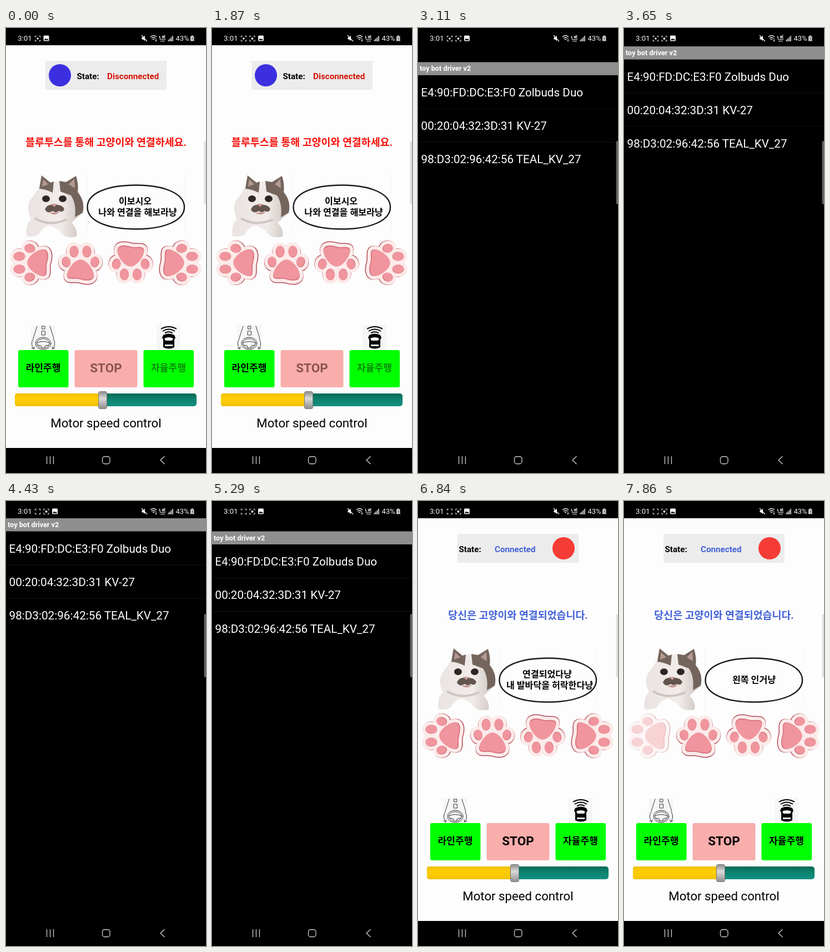
An HTML page that plays this animation: 360 by 800 pixels, repeating every 8000 ms.

```html
<!DOCTYPE html>
<html lang="ko">
<head>
<meta charset="utf-8">
<title>Remote</title>
<style>
html, body { margin: 0; width: 100%; height: 100%; overflow: hidden; background: #000; }
svg { display: block; width: 360px; height: 800px; font-family: Roboto, "Noto Sans CJK KR", sans-serif; }
.b { font-weight: 700; }
.mid { text-anchor: middle; }
.line { fill: none; stroke: #222; stroke-width: .9; stroke-linecap: round; }
.bubble { font-size: 16.1px; }
.mode { font-size: 17.1px; }
</style>
</head>
<body>
<svg viewBox="0 0 360 800">
  <defs>
    <linearGradient id="gold" x2="0" y2="1">
      <stop stop-color="#f2c000"/><stop offset=".4" stop-color="#ffce05"/><stop offset="1" stop-color="#f2c200"/>
    </linearGradient>
    <linearGradient id="teal" x2="0" y2="1">
      <stop stop-color="#056b58"/><stop offset=".5" stop-color="#0f8470"/><stop offset="1" stop-color="#129080"/>
    </linearGradient>
    <linearGradient id="metal" x2="0" y2="1">
      <stop stop-color="#8c8c8c"/><stop offset=".4" stop-color="#dadada"/><stop offset="1" stop-color="#8e8e8e"/>
    </linearGradient>
    <linearGradient id="fur">
      <stop stop-color="#e9e3e1"/><stop offset=".6" stop-color="#f1ecea"/><stop offset="1" stop-color="#c9c0bb"/>
    </linearGradient>
    <g id="pads">
      <path d="M0-6C11-6 24 11 24 22S10 32 0 29S-24 32-24 22S-11-6 0-6Z"/>
      <ellipse cx="-26" cy="-2" rx="7.500" ry="9.500" transform="rotate(-18 -26 -2)"/>
      <ellipse cx="26" cy="-2" rx="7.500" ry="9.500" transform="rotate(18 26 -2)"/>
      <ellipse cx="-11.500" cy="-21" rx="8" ry="10.500"/>
      <ellipse cx="11.500" cy="-21" rx="8" ry="10.500"/>
    </g>
    <g id="paw">
      <use href="#pads" y="1" fill="#b34a55" stroke="#b34a55" stroke-width="13" stroke-linejoin="round"/>
      <use href="#pads" fill="#fbebea" stroke="#fbebea" stroke-width="12" stroke-linejoin="round"/>
      <use href="#pads" fill="#d8747f"/>
      <use href="#pads" y="-1" fill="#f0959d" transform="scale(.97)"/>
    </g>
    <path id="shot" d="M-4.500-2V-4.500H-2M2-4.500H4.500V-2M4.500 2V4.500H2M-2 4.500H-4.500V2" fill="none" stroke="#ddd" stroke-width="1.100"/>
  </defs>

  <rect width="360" height="800"/>

  <g id="main">
    <rect y="31" width="360" height="724" fill="#fdfdfd"/>
    <rect x="71" y="59" width="218" height="52" fill="#ececec"/>
    <circle id="link" cy="85" r="20"/>
    <text id="label" class="b" y="91.500" font-size="15.200">State:</text>
    <text id="state" class="b" y="91.500" font-size="15.200"></text>
    <text id="notice" class="b mid" x="180" y="212" font-size="18.400"></text>

    <g id="cat">
      <path d="M37 374Q34 354 45 344Q34 322 46 306Q56 294 60 284L64 265L80 278Q94 273 108 277L126 266Q131 282 129 295Q143 312 138 332L118 350Q130 362 127 375Q104 380 96 364L80 355Q66 357 59 371Q48 377 37 374Z" fill="url(#fur)"/>
      <path d="M60 289L64 265L80 278L86 276L84 296Q72 290 60 289ZM96 275L108 277L126 266Q131 282 129 295Q143 312 138 332L124 340Q127 316 117 301L98 294Z" fill="#74655c"/>
      <path d="M65 285L67 272L76 281ZM113 281L123 271L124 288Z" fill="#b59a92"/>
      <ellipse cx="72" cy="307" rx="7" ry="6" fill="#2d2522"/>
      <ellipse cx="102" cy="307" rx="7" ry="6" fill="#2d2522"/>
      <path d="M70 326Q74 316 86 318Q100 316 105 325Q103 333 95 329Q90 333 84 329Q74 335 70 326Z" fill="#63554d"/>
      <path d="M81 316H92L87 322Z" fill="#d19d98"/>
      <path d="M78 332Q87 339 97 331Z" fill="#c9938f"/>
      <path d="M52 342Q78 358 110 344" fill="none" stroke="#cfc5c0" stroke-width="4"/>
    </g>

    <path d="M145.500 264V376M322.500 264V376" stroke="#f5f5f5"/>
    <path d="M146.500 322C146.500 297 182 282.500 234 282.500S321 298 321 322S286 361.500 234 361.500S146.500 347 146.500 322Z" fill="#fdfdfd" stroke="#1b1b1b" stroke-width="2.400"/>
    <text id="say1" class="b mid bubble"></text>
    <text id="say2" class="b mid bubble" x="237" y="337"></text>

    <use id="left" href="#paw" transform="translate(45 422) rotate(-90)"/>
    <use href="#paw" transform="translate(134 423)"/>
    <use href="#paw" transform="translate(224.500 422) rotate(180)"/>
    <use href="#paw" transform="translate(314 422) rotate(90)"/>

    <rect x="45" y="534" width="44" height="45" fill="#f6f6f6"/>
    <g class="line">
      <path d="M56 536L49 558M79 536L86 558M65 536H70V541H65ZM64.500 545H70.500V552H64.500Z"/>
      <ellipse cx="67" cy="567" rx="14" ry="11"/>
      <ellipse cx="67" cy="567" rx="11.500" ry="8.500"/>
      <path d="M56 566Q67 561 78 566M57 570L63 571L65 575M77 570L71 571L69 575"/>
      <path d="M49 559Q43 568 50 577M46 575L50 577L51 573M85 559Q91 568 84 577M88 575L84 577L83 573"/>
    </g>
    <rect x="271" y="534" width="43" height="45" fill="#f6f6f6"/>
    <path d="M279 541Q293 533 307 541M282 545Q293 538 304 545M286 548.500Q293 544 300 548.500" fill="none" stroke="#000" stroke-width="2"/>
    <path d="M283 552Q293 547 303 552L305 557L303 560V574Q293 579 283 574V560L281 557Z"/>
    <path d="M285 558Q293 554 301 558L299 562H287ZM286 569H300V572H286Z" fill="#f6f6f6"/>

    <rect x="22" y="579" width="90.500" height="67" rx="3" fill="#0f0"/>
    <rect x="123.500" y="579" width="113" height="67" rx="3" fill="#f9aeac"/>
    <rect x="247.500" y="579" width="90.500" height="67" rx="3" fill="#0f0"/>
    <text class="b mid mode" x="67" y="616.500">라인주행</text>
    <text id="stop" class="b mid" x="180" y="619" font-size="22.500">STOP</text>
    <text id="auto" class="b mid mode" x="292.500" y="616.500">자율주행</text>

    <rect x="16" y="657" width="327" height="23" rx="5" fill="url(#teal)"/>
    <path d="M174 657H21Q16 657 16 662V675Q16 680 21 680H174Z" fill="url(#gold)"/>
    <rect x="166.500" y="653.500" width="15" height="31" rx="3" fill="url(#metal)" stroke="#777"/>
    <text class="mid" x="180" y="717.500" font-size="22.200">Motor speed control</text>
  </g>

  <g id="list">
    <rect y="-400" width="360" height="1400"/>
    <rect width="360" height="23.500" fill="#8f8f8f"/>
    <text class="b" x="3" y="16" font-size="12.700" fill="#fff">toy bot driver v2</text>
    <path d="M0 83.500H360M0 144H360" stroke="#121212"/>
    <g font-size="20.700" fill="#fff">
      <text x="5.500" y="61.500">E4:90:FD:DC:E3:F0 Zolbuds Duo</text>
      <text x="5.500" y="121.700">00:20:04:32:3D:31 KV-27</text>
      <text x="5.500" y="182">98:D3:02:96:42:56 TEAL_KV_27</text>
    </g>
  </g>

  <rect x="356.500" y="203" width="8" height="114" rx="3" fill="#c4c4c4" fill-opacity=".5"/>

  <g id="status" fill="#f4f4f4">
    <text x="21" y="23" font-size="13.300">3:01</text>
    <use href="#shot" x="57" y="19"/>
    <circle id="dot" cx="57" cy="19" r="1.700"/>
    <g id="extra"><use href="#shot" x="72.500" y="19"/><circle cx="72.500" cy="19" r="2"/></g>
    <g id="photo">
      <rect x="-5" y="13.500" width="10" height="10" rx="1.500"/>
      <path d="M-4 22L-1.500 18.500L.5 20.500L2 19L4 22Z" fill="#111"/>
    </g>
    <path d="M244.500 16.500H247L250 13.500V23.500L247 20.500H244.500Z"/>
    <path d="M244 13L254 24" stroke="#f4f4f4" stroke-width="1.200"/>
    <g fill="none" stroke="#f4f4f4" stroke-width="1.400">
      <path d="M260 16Q265.500 11 271 16M262 18.500Q265.500 15.500 269 18.500M264 21Q265.500 19.500 267 21"/>
      <path d="M270 19V24M268.500 22.500L270 24L271.500 22.500" stroke-width="1"/>
      <path d="M276.500 14V18H279M281 14L282.500 18L284 14M287 14H285V18H287M276.500 20.500H287M278 23.500H286" stroke-width="1.200"/>
      <path d="M292.500 21V24M295 19V24M297.500 16.500V24M300 14V24" stroke-width="1.500"/>
    </g>
    <text x="305.500" y="23" font-size="13">43%</text>
    <path d="M333.500 13.500H337V15H338.500V24H332V15H333.500Z" fill="#ccc"/>
    <path d="M331 23.500H340M335.500 16.500V21" stroke="#555" stroke-width="1.200"/>
  </g>

  <g fill="none" stroke="#d0d0d0" stroke-width="1.300">
    <path d="M73.500 770V784M79.500 770V784M85.500 770V784"/>
    <rect x="173.500" y="770.500" width="13.500" height="13" rx="4"/>
    <path d="M285.500 770L278 777L285.500 784"/>
  </g>
</svg>
<script>
const LOOP = 8000, OPEN = 2760, CLOSE = 5200, CONNECT = 5600, PRESS = 7430;
const el = id => document.getElementById(id);
const clamp = v => Math.max(0, Math.min(1, v));
const set = (id, attrs) => {
  for (const k in attrs) el(id).setAttribute(k, attrs[k]);
};
const say = (id, text) => { if (el(id).textContent !== text) el(id).textContent = text; };

// The list slides up over the page, then drops and fades away.
function drawList(t) {
  const closing = t >= CLOSE;
  const alpha = closing ? clamp((5480 - t) / 180) : clamp((t - OPEN) / 125);
  const drop = closing ? 23 * ((t - CLOSE) / 90) ** 2 : 112 * Math.exp((2850 - t) / 200);
  set("main", { transform: `translate(0 ${-8.3 * alpha})` });
  set("list", { transform: `translate(0 ${31 + (alpha ? drop : 0)})`, opacity: alpha });
}

function drawControls(t) {
  const on = t >= CONNECT, pressed = t >= PRESS;
  set("link", { cx: on ? 262 : 97, fill: on ? "#f53b35" : "#3b2fe0" });
  set("label", { x: on ? 73.5 : 127.5 });
  set("state", { x: on ? 138 : 182, fill: on ? "#4262d8" : "#d31507" });
  say("state", on ? "Connected" : "Disconnected");
  set("notice", { fill: on ? "#4262d8" : "#f8100a" });
  say("notice", on ? "당신은 고양이와 연결되었습니다." : "블루투스를 통해 고양이와 연결하세요.");
  set("say1", { x: pressed ? 234 : 232.5, y: pressed ? 327 : 317 });
  say("say1", pressed ? "왼쪽 인거냥" : on ? "연결되었다냥" : "이보시오");
  say("say2", pressed ? "" : on ? "내 발바닥을 허락한다냥" : "나와 연결을 해보라냥");
  set("left", { opacity: pressed ? 0.4 : 1 });
  set("stop", { fill: on ? "#000" : "#8c5550" });
  set("auto", { fill: on ? "#000" : "#0b8a0b" });
}

function drawStatus(t) {
  const slide = clamp((t - 300) / 300);
  set("extra", { opacity: slide });
  set("photo", { transform: `translate(${72.5 + 15.5 * slide} 0)` });
  set("dot", { opacity: t < 4230 ? 1 : 0 });
}

function frame() {
  const t = performance.now() % LOOP;
  drawList(t);
  drawControls(t);
  drawStatus(t);
  requestAnimationFrame(frame);
}
frame();
</script>
</body>
</html>
```
